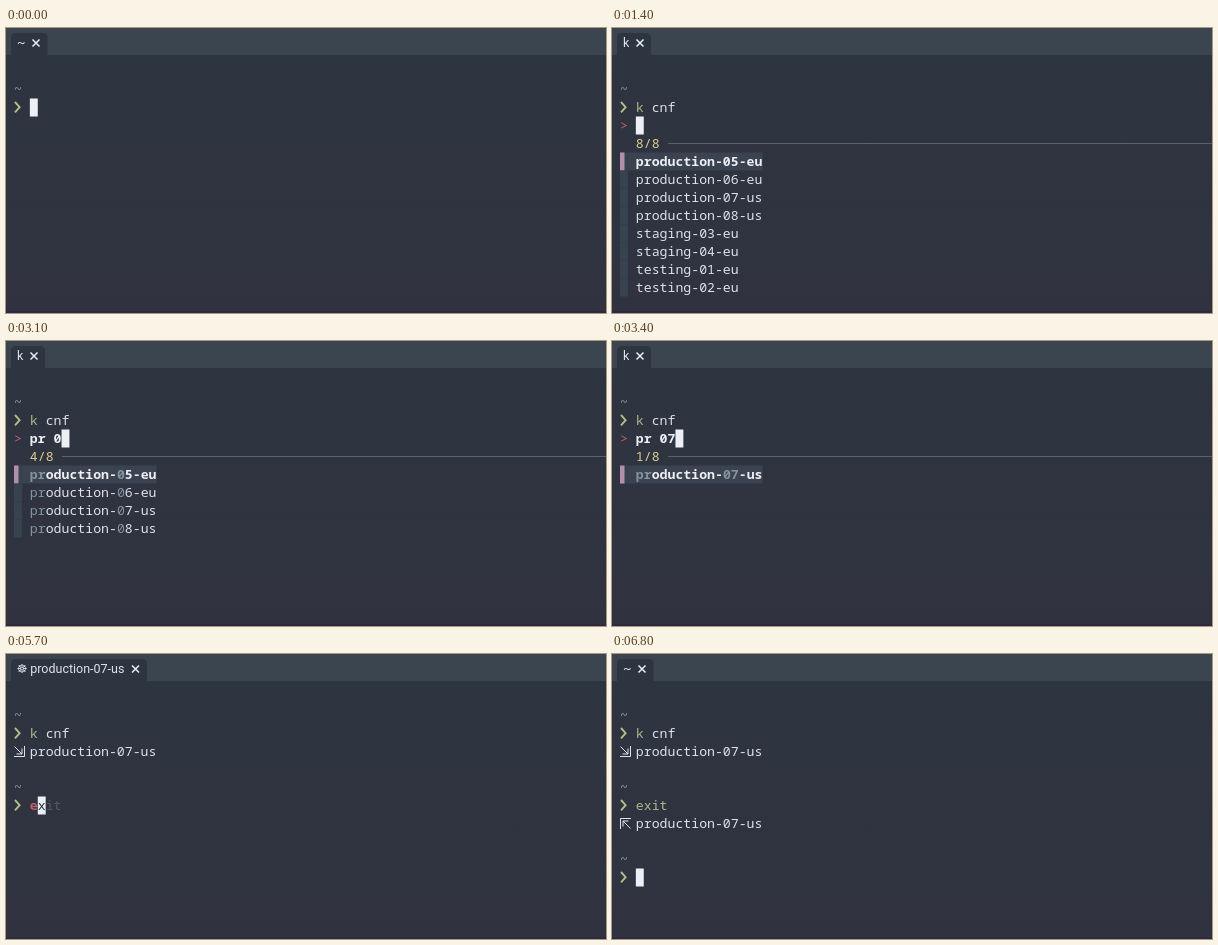
These frames come from a looping animation (600x285 px, 7500 ms). An HTML page:

```html
<!DOCTYPE html>
<html lang="en">
<head>
<meta charset="utf-8">
<title>Terminal</title>
<style>
html, body { margin: 0; height: 100%; overflow: hidden; background: #2d3440; }
svg { display: block; width: 100vw; height: 100vh; }
text { white-space: pre; font: 13.2px "Noto Sans Mono", "DejaVu Sans Mono", monospace; }
.bold { font-weight: 700; }
.tab text { font: 12.5px Roboto, "DejaVu Sans", sans-serif; fill: #dfe4ec; }
path { fill: none; }
</style>
</head>
<body>
<svg viewBox="0 0 600 285">
  <defs>
    <linearGradient id="bg" x2="0" y2="1">
      <stop stop-color="#2c3540"/><stop offset="1" stop-color="#313240"/>
    </linearGradient>
  </defs>
  <rect width="600" height="285" fill="url(#bg)"/>
  <rect y="283" width="600" height="2" fill="#2b2a40"/>
  <rect width="600" height="27" fill="#3a454f"/>
  <g id="view"></g>
</svg>
<script>
const LOOP = 7500, CELL = 7.92, ROW = 18, LEFT = 8, TOP = 52.5;
const C = { fg: '#dce1ea', white: '#eceff4', green: '#a9b98a', red: '#c2616b', yellow: '#dfcd8f',
  path: '#8aa0a8', dim: '#505a68', match: '#8593a1', gutter: '#37434f', select: '#3b4350',
  pink: '#b48ead', line: '#59626d', dark: '#2d3440' };
const CHOSEN = 'production-07-us';
const CLUSTERS = ['production-05-eu', 'production-06-eu', CHOSEN, 'production-08-us',
  'staging-03-eu', 'staging-04-eu', 'testing-01-eu', 'testing-02-eu'];
const view = document.getElementById('view');

const px = col => LEFT + col * CELL;
const py = row => TOP + row * ROW;
const rect = (x, y, w, h, fill) => `<rect x="${x}" y="${y}" width="${w}" height="${h}" fill="${fill}"/>`;
const stroke = (d, color, width) => `<path d="${d}" stroke="${color}" stroke-width="${width}"/>`;
const text = (col, row, str, fill = C.fg, bold = false) =>
  `<text x="${px(col)}" y="${py(row) + 13.3}" fill="${fill}"${bold ? ' class="bold"' : ''}>${str.replace('>', '&gt;')}</text>`;
const cursor = (col, row, under = '') =>
  rect(px(col), py(row), CELL, ROW, C.white) + text(col, row, under, C.dark);
const typedBy = (t, times) => times.filter(at => t >= at).length;

function tab(t) {
  const [name, cross] = t >= 1200 && t < 5100 ? ['k', 28]
    : t >= 5100 && t < 6700 ? [CHOSEN, 129.5] : ['~', 30];
  const right = cross + (name === 'k' ? 11 : 11.5);
  const label = name === CHOSEN
    ? `<text x="10.5" y="19.3">☸</text><text x="24.2" y="19.3">${name}</text>`
    : `<text x="11" y="19.3">${name}</text>`;
  return `<g class="tab">` +
    `<path d="M5 27V10Q5 5 10 5H${right - 5}Q${right} 5 ${right} 10V27Z" style="fill:#2c3540"/>${label}` +
    stroke(`M${cross - 3.5} 11.5l7 7m0 -7l-7 7`, C.white, 1.5) + '</g>';
}

function prompt(row) {
  const y = py(row);
  return text(0, row - 1, '~', C.path) + stroke(`M9 ${y + 3.5}l4.6 5.2l-4.6 5.2`, '#b3bd86', 1.9);
}

// A command line with the untyped rest shown as a suggestion
function command(row, full, n, active, color) {
  const typed = full.slice(0, n), word = typed.split(' ')[0];
  let out = text(2, row, word, color, color === C.red) +
    text(2 + word.length, row, typed.slice(word.length));
  if (n && n < full.length) out += text(3 + n, row, full.slice(n + 1), C.dim);
  if (active) out += cursor(2 + n, row, n ? full[n] || '' : '');
  return out;
}

function option(name, row, selected, terms) {
  const y = py(row);
  let out = rect(LEFT, y, CELL, ROW, C.gutter);
  if (selected) out += rect(LEFT + CELL, y, CELL * 17, ROW, C.select) + rect(LEFT, y, 4.5, ROW, C.pink);
  const hits = new Set();
  for (const term of terms)
    for (let i = 0; i < term.length; i++) hits.add(name.indexOf(term) + i);
  const spans = [...name].map((ch, i) => hits.has(i) ? `<tspan fill="${C.match}">${ch}</tspan>` : ch);
  return out + text(2, row, spans.join(''), selected ? C.white : C.fg, selected).replace(/&gt;/, '>');
}

function finder(t) {
  const query = 'pr 07'.slice(0, typedBy(t, [2200, 2400, 2500, 3100, 3400]));
  let out = text(0, 2, '>', C.red) + text(2, 2, query, C.white, true) + cursor(2 + query.length, 2);
  if (t < 1400) return out;
  const terms = query.split(' ').filter(Boolean);
  const found = CLUSTERS.filter(name => terms.every(term => name.includes(term)));
  out += text(2, 3, `${found.length}/8`, C.yellow) + rect(56, 115, 544, 1, C.line);
  return out + found.map((name, i) => option(name, 4 + i, i === 0, terms)).join('');
}

function entered(row, leaving) {
  const y = py(row) + 3.5;
  const mark = leaving
    ? `M8.5 ${y + 11}V${y + .5}H19M18.5 ${y + 10.5}L11 ${y + 3}M11 ${y + 8.5}V${y + 3}H16.5`
    : `M8 ${y + 10.5}H18.5V${y}M8.5 ${y + .5}L16 ${y + 8}M16 ${y + 2.5}V${y + 8}H10.5`;
  return stroke(mark, C.fg, 1) + text(2, row, CHOSEN);
}

function scene(t) {
  let out = tab(t) + prompt(1) +
    command(1, 'k cnf', typedBy(t, [200, 400, 600, 800, 900]), t < 1200, C.green);
  if (t < 1200) return out;
  if (t < 1300) return out + cursor(0, 2);
  if (t < 4200) return out + finder(t);
  if (t < 4300) return out + cursor(0, 2);
  out += entered(2, false);
  if (t < 5200) return out + cursor(0, 3);
  if (t < 5300) return out + text(0, 4, '~', C.path) + cursor(0, 5);
  out += prompt(5) + command(5, 'exit', typedBy(t, [5700, 5900, 6000, 6200]), t < 6700,
    t < 6200 ? C.red : C.green);
  if (t < 6700) return out;
  out += entered(6, true);
  return out + (t < 6800 ? cursor(0, 7) : prompt(9) + cursor(2, 9));
}

let shown = '';
function draw() {
  const next = scene(performance.now() % LOOP);
  if (next !== shown) view.innerHTML = shown = next;
  requestAnimationFrame(draw);
}
draw();
</script>
</body>
</html>
```
